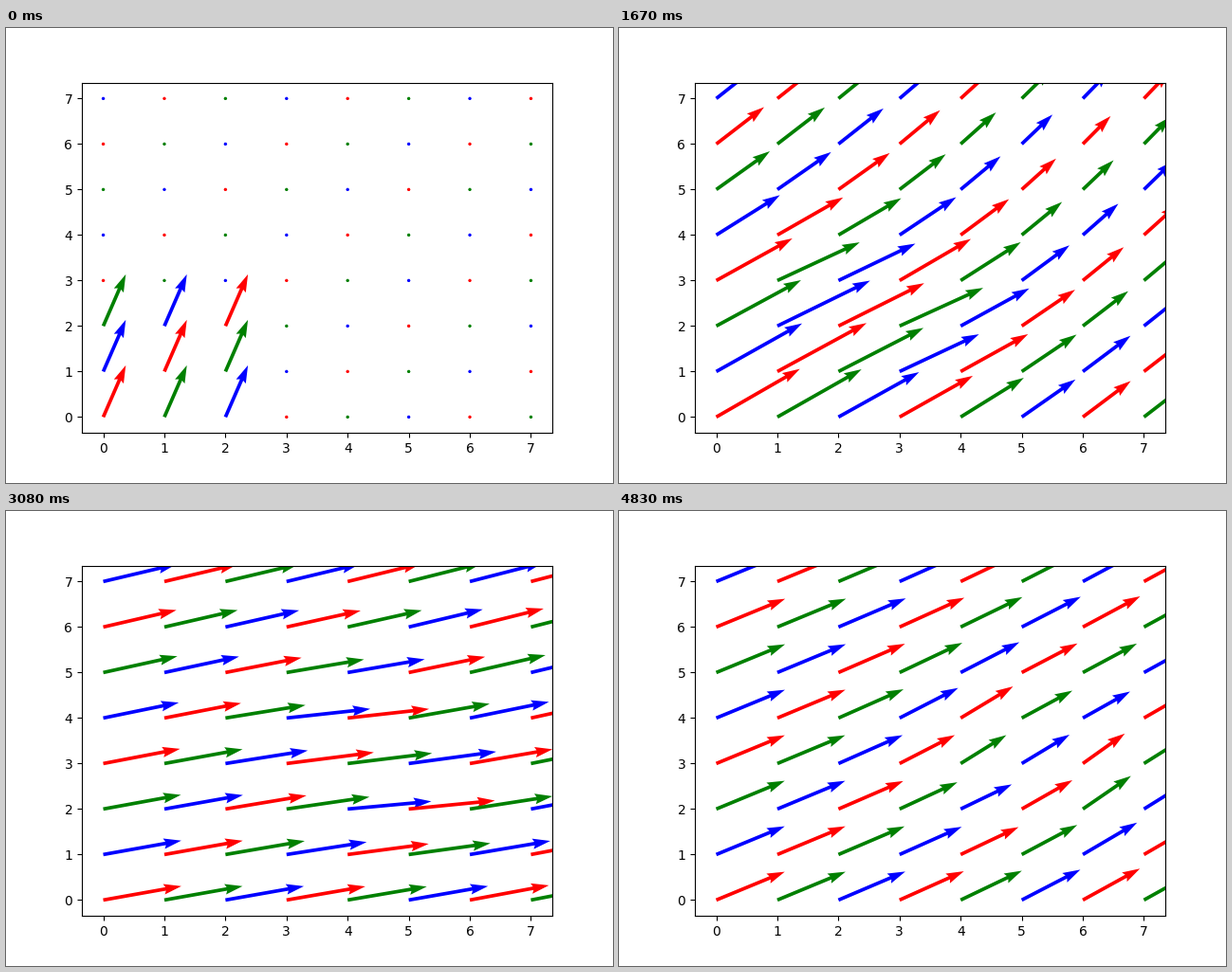
Recreate the animation shown at these times as a matplotlib script. Size 640 by 480 pixels, loop 4910 ms.

```python
import numpy as np
import matplotlib.pyplot as plt
from matplotlib.animation import FuncAnimation

N = 8
FRAMES = 59
LOOP_MS = 4910
START = 8          # steps until the wind has filled the grid
REACH = 1.42       # radius of the gust, in cells
STRETCH = 1.17     # extra push along the gust's own direction

X, Y = np.meshgrid(np.arange(N), np.arange(N))
GRID = np.column_stack([X.ravel(), Y.ravel()]).astype(float)

# Key points of the wind, in pixels of arrow length:
# step, gust centre, gust strength, wind at lower left, lower right, upper left
KEYS = np.array([
    (8, 1.5, 2.6, 14, 16, 49, 68, 7.5, 12, 7, 13.5),
    (20, 2.2, 2.2, 14, -3, 85.5, 50, 48, 37, 48, 38),
    (29, 3, 3, 8, -14, 78.5, 24.5, 70, 28, 66, 30),
    (37, 4, 3, 8, -5.5, 81.5, 14.5, 82, 16, 76, 18),
    (46, 5, 3, -2.5, 13.5, 84.5, 19.5, 82, 27, 81.5, 20),
    (58, 4.9, 3, -12.5, -2, 71.5, 29.5, 60, 33, 72, 29.5),
])
TIMES, VALUES = KEYS[:, 0], KEYS[:, 1:]
SLOPES = np.gradient(VALUES, TIMES, axis=0)


def wind_at(t):
    """Smooth path through the key points."""
    k = min(np.searchsorted(TIMES, t, side="right") - 1, len(TIMES) - 2)
    h = TIMES[k + 1] - TIMES[k]
    s = (t - TIMES[k]) / h
    return ((1 + 2 * s) * (1 - s) ** 2 * VALUES[k]
            + s * (1 - s) ** 2 * h * SLOPES[k]
            + s * s * (3 - 2 * s) * VALUES[k + 1]
            + s * s * (s - 1) * h * SLOPES[k + 1])


def fade(cells):
    """Ease from 0 to 1 across the grid, flat at both walls."""
    return np.sin(np.pi * cells / (2 * (N - 1))) ** 2.6


def breeze(home, right, top):
    """Background wind that falls off by a steady ratio along each axis."""
    sx, sy = fade(GRID[:, :1]), fade(GRID[:, 1:])
    return home * (right / home) ** sx * (top / home) ** sy


def gust(center, strength):
    """Local push, stronger ahead of and behind its centre than beside it."""
    d = GRID - center
    r2 = (d ** 2).sum(axis=1, keepdims=True)
    along = (d @ strength)[:, None]
    push = strength + STRETCH * d * along / (r2 + 0.5)
    return np.exp(-r2 / (2 * REACH ** 2)) * push


def field(t):
    center, strength, home, right, top = wind_at(max(t, START)).reshape(5, 2)
    flow = breeze(home, right, top) + gust(center, strength)
    corner = (GRID < 3).all(axis=1)[:, None]
    first = np.where(corner, (23.5, 54.0), 0.0)
    grown = min(t / START, 1)
    return first + (flow - first) * grown


fig, ax = plt.subplots(figsize=(6.4, 4.8), dpi=100)
palette = ["red", "green", "blue"]
start = field(0)
arrows = ax.quiver(GRID[:, 0], GRID[:, 1], start[:, 0], start[:, 1],
                   color=[palette[i % 3] for i in range(N * N)],
                   angles="uv", scale_units="dots", scale=0.99)


def update(i):
    uv = field(i)
    arrows.set_UVC(uv[:, 0], uv[:, 1])
    return (arrows,)


anim = FuncAnimation(fig, update, frames=FRAMES, interval=LOOP_MS / FRAMES,
                     repeat=True, repeat_delay=0, blit=False)
plt.show()
```
